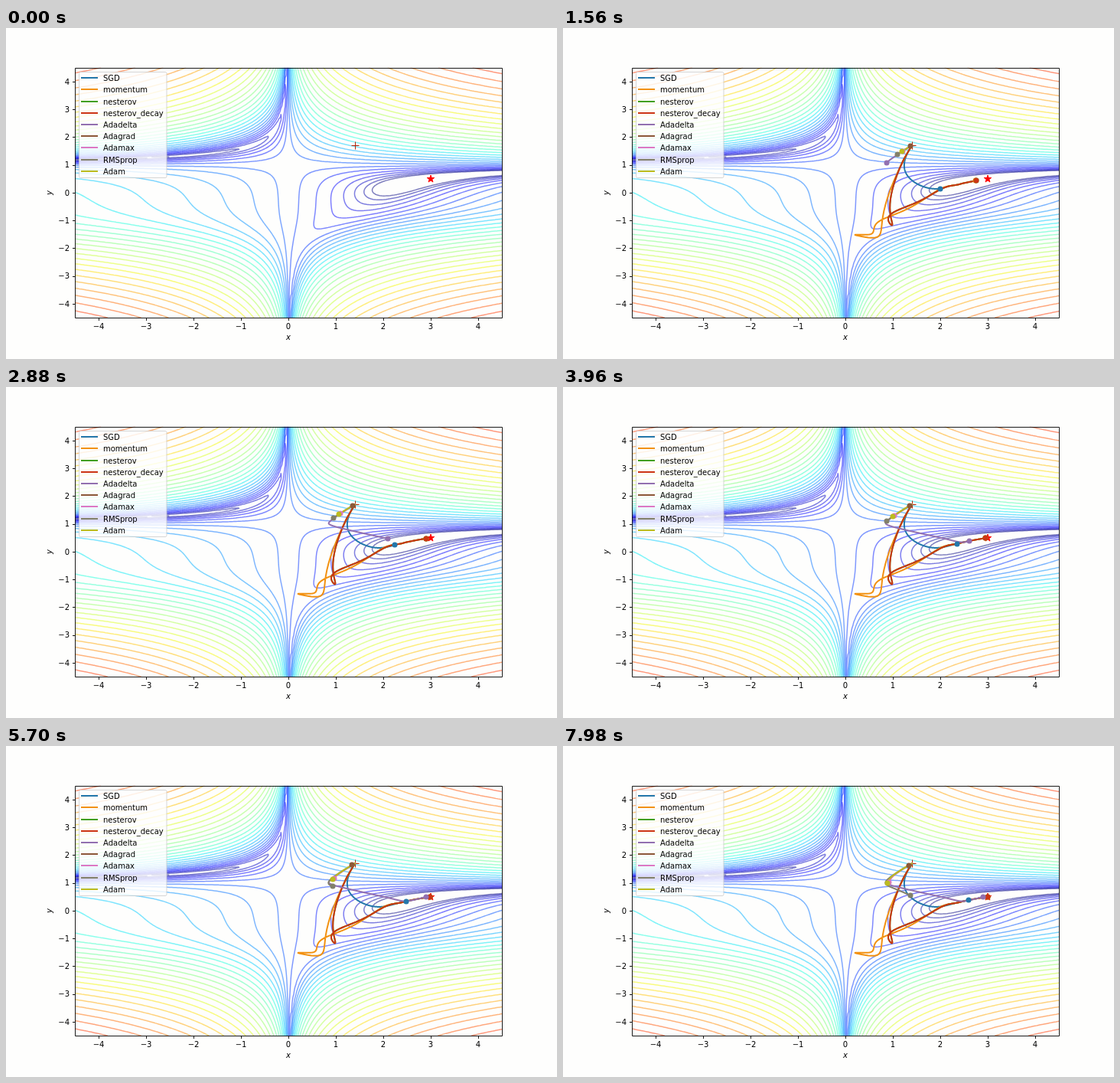
Animation, 720 px wide and 432 px high, one loop 8 s. Source, as an HTML page:

```html
<!DOCTYPE html>
<html lang="en">
<head>
<meta charset="utf-8">
<title>Optimizers on a loss surface</title>
<style>
  html, body { margin: 0; width: 100%; height: 100%; overflow: hidden; background: #fefefd; }
  svg { display: block; }
  text { font: 10px "DejaVu Sans", sans-serif; fill: #000; }
  .math { font-style: italic; }
</style>
</head>
<body>
<svg id="stage" width="720" height="432" viewBox="0 0 720 432"></svg>
<script>
const stage = document.getElementById('stage');
const LIMIT = 4.5, FRAME_MS = 60, LOOP_MS = 8000, STEPS_PER_FRAME = 10, STEPS = 1340;
const START = [1.4, 1.7], MINIMUM = [3, 0.5], RATE = 0.001;
const LEFT = 90, RIGHT = 648, TOP = 51.84, BOTTOM = 378;

const px = x => LEFT + (x + LIMIT) / (2 * LIMIT) * (RIGHT - LEFT);
const py = y => BOTTOM - (y + LIMIT) / (2 * LIMIT) * (BOTTOM - TOP);
const pixel = (x, y) => px(x).toFixed(2) + ' ' + py(y).toFixed(2);
const crisp = v => Math.round(v) + .5; // centre of a pixel, for thin straight lines

function add(tag, attrs, content) {
  const el = document.createElementNS('http://www.w3.org/2000/svg', tag);
  for (const key in attrs) el.setAttribute(key, attrs[key]);
  if (content) el.textContent = content;
  return stage.appendChild(el);
}

// Beale function and its gradient
const TERMS = [1.5, 2.25, 2.625];
const residual = (k, x, y) => TERMS[k - 1] - x + x * y ** k;
const beale = (x, y) => [1, 2, 3].reduce((sum, k) => sum + residual(k, x, y) ** 2, 0);
function gradient(x, y) {
  let gx = 0, gy = 0;
  for (let k = 1; k <= 3; k++) {
    const r = 2 * residual(k, x, y);
    gx += r * (y ** k - 1);
    gy += r * x * k * y ** (k - 1);
  }
  return [gx, gy];
}

// Jet colour map, v from 0 to 1
function jet(v) {
  const ramp = (...stops) => {
    for (let i = 2; i < stops.length; i += 2) {
      if (v <= stops[i]) {
        const t = (v - stops[i - 2]) / (stops[i] - stops[i - 2]);
        return Math.round(255 * (stops[i - 1] + t * (stops[i + 1] - stops[i - 1])));
      }
    }
  };
  const r = ramp(0, 0, .35, 0, .66, 1, .89, 1, 1, .5);
  const g = ramp(0, 0, .125, 0, .375, 1, .64, 1, .91, 0, 1, 0);
  const b = ramp(0, .5, .11, 1, .34, 1, .65, 0, 1, 0);
  return `rgb(${r},${g},${b})`;
}

// Contours by marching squares, with levels spaced evenly in the logarithm
function drawContours() {
  const N = 200, LEVELS = 35;
  const axis = Array.from({ length: N }, (_, i) => -LIMIT + 2 * LIMIT * i / (N - 1));
  const z = axis.map(y => axis.map(x => beale(x, y)));
  const levels = Array.from({ length: LEVELS }, (_, n) => 10 ** (6 * n / (LEVELS - 1)));
  const paths = levels.map(() => '');
  for (let j = 0; j < N - 1; j++) for (let i = 0; i < N - 1; i++) {
    const corners = [[i, j], [i + 1, j], [i + 1, j + 1], [i, j + 1]]
      .map(([a, b]) => ({ x: axis[a], y: axis[b], z: z[b][a] }));
    const heights = corners.map(c => c.z);
    const low = Math.min(...heights), high = Math.max(...heights);
    levels.forEach((level, n) => {
      if (level < low || level >= high) return;
      const points = [];
      corners.forEach((p, k) => {
        const q = corners[(k + 1) % 4];
        if ((p.z > level) === (q.z > level)) return;
        const t = (level - p.z) / (q.z - p.z);
        points.push(pixel(p.x + t * (q.x - p.x), p.y + t * (q.y - p.y)));
      });
      if (points.length === 4) {
        const center = heights.reduce((sum, h) => sum + h / 4, 0);
        if ((center > level) !== (heights[0] > level)) points.unshift(points.pop());
      }
      for (let k = 0; k < points.length; k += 2) paths[n] += `M${points[k]}L${points[k + 1]}`;
    });
  }
  paths.forEach((d, n) => d && add('path', {
    d, fill: 'none', stroke: jet(n / (LEVELS - 1)), 'stroke-width': 1.5,
    'stroke-opacity': .5, 'stroke-linecap': 'round', 'clip-path': 'url(#plot)'
  }));
}

// Each rule makes an updater for one coordinate: (gradient, step) -> change
const nesterov = decay => () => {
  let v = 0;
  return (g, t) => {
    const step = RATE / (1 + decay * t) * g;
    v = .9 * v - step;
    return .9 * v - step;
  };
};
const rules = {
  sgd: () => g => -RATE * g,
  momentum: () => { let v = 0; return g => v = .9 * v - RATE * g; },
  adagrad: () => { let a = 0; return g => (a += g * g, -RATE * g / Math.sqrt(a)); },
  rmsprop: () => {
    let a = 0;
    return g => (a = .99 * a + .01 * g * g, -RATE * g / (Math.sqrt(a) + 1e-8));
  },
  adamax: () => {
    let m = 0, u = 0;
    return (g, t) => {
      m = .9 * m + .1 * g;
      u = Math.max(.999 * u, Math.abs(g));
      return -RATE / (1 - .9 ** t) * m / (u + 1e-8);
    };
  },
  adam: () => {
    let m = 0, v = 0;
    return (g, t) => {
      m = .9 * m + .1 * g;
      v = .999 * v + .001 * g * g;
      return -RATE * m / (1 - .9 ** t) / (Math.sqrt(v / (1 - .999 ** t)) + 1e-8);
    };
  }
};

function descend(rule) {
  const stepX = rule(), stepY = rule(), path = [START];
  let [x, y] = START;
  for (let t = 1; t < STEPS; t++) {
    const [gx, gy] = gradient(x, y);
    x += stepX(gx, t);
    y += stepY(gy, t);
    path.push([x, y]);
  }
  return path;
}

// Smooth path through [step, x, y] keys
function throughKeys(keys) {
  const slope = (i, c) => {
    const a = keys[Math.max(i - 1, 0)], b = keys[Math.min(i + 1, keys.length - 1)];
    return (b[c] - a[c]) / (b[0] - a[0]);
  };
  return Array.from({ length: STEPS }, (_, step) => {
    let i = 0;
    while (i < keys.length - 2 && step > keys[i + 1][0]) i++;
    const a = keys[i], b = keys[i + 1], span = b[0] - a[0], t = (step - a[0]) / span;
    return [1, 2].map(c =>
      a[c] + (b[c] - a[c]) * t * t * (3 - 2 * t) +
      span * t * (1 - t) * (slope(i, c) * (1 - t) - slope(i + 1, c) * t));
  });
}

const adadelta = throughKeys([
  [0, 1.4, 1.7], [130, 1.1, 1.37], [260, .87, 1.08], [300, .87, .98], [340, 1.08, .86],
  [480, 2.1, .465], [570, 2.42, .345], [660, 2.61, .375], [820, 2.87, .485],
  [960, 2.9, .49], [1340, 2.91, .49]
]);

const series = [
  ['SGD', '#2377ab', descend(rules.sgd)],
  ['momentum', '#f29111', descend(rules.momentum)],
  ['nesterov', '#429f16', descend(nesterov(0))],
  ['nesterov_decay', '#cc3514', descend(nesterov(1e-6))],
  ['Adadelta', '#9270b0', adadelta],
  ['Adagrad', '#8c5838', descend(rules.adagrad)],
  ['Adamax', '#dc78c4', descend(rules.adamax)],
  ['RMSprop', '#82806a', descend(rules.rmsprop)],
  ['Adam', '#bcbc20', descend(rules.adam)]
].map(([name, color, path]) => ({ name, color, path, points: path.map(p => pixel(...p)) }));

function drawMarkers() {
  const [sx, sy] = [crisp(px(START[0])), crisp(py(START[1]))];
  add('path', { d: `M${sx - 5} ${sy}h10M${sx} ${sy - 5}v10`, stroke: '#b42408' });
  const star = Array.from({ length: 10 }, (_, k) => {
    const r = k % 2 ? 1.91 : 5, a = (k / 5 - .5) * Math.PI;
    return [Math.round(px(MINIMUM[0])) + r * Math.cos(a), Math.round(py(MINIMUM[1])) + r * Math.sin(a)];
  });
  add('polygon', { points: star.join(' '), fill: '#f00', stroke: '#f00' });
}

function drawAxes() {
  const [left, right, top, bottom] = [LEFT, RIGHT, TOP, BOTTOM].map(crisp);
  let ticks = '';
  for (let v = -4; v <= 4; v++) {
    const label = String(v).replace('-', '\u2212');
    ticks += `M${crisp(px(v))} ${bottom}v3.5M${left} ${crisp(py(v))}h-3.5`;
    add('text', { x: px(v), y: 393, 'text-anchor': 'middle' }, label);
    add('text', { x: 83, y: Math.round(py(v) + 3.8), 'text-anchor': 'end' }, label);
  }
  add('path', {
    d: `M${left} ${top}H${right}V${bottom}H${left}Z` + ticks,
    fill: 'none', stroke: '#000', 'stroke-width': .9
  });
  add('text', { x: 369, y: 407, 'text-anchor': 'middle', class: 'math' }, 'x');
  add('text', { transform: 'translate(60 215) rotate(-90)', 'text-anchor': 'middle', class: 'math' }, 'y');
}

function drawLegend() {
  add('rect', {
    x: 95.5, y: 57.5, width: 114.5, height: 138, rx: 2,
    fill: '#fff', stroke: '#ccc', opacity: .8
  });
  series.forEach(({ name, color }, k) => {
    const y = Math.round(65.2 + 15.19 * k);
    add('path', { d: `M98 ${y}h22`, stroke: color, 'stroke-width': 2 });
    add('text', { x: 127, y: y + 4 }, name);
  });
}

add('clipPath', { id: 'plot' }).appendChild(
  add('rect', { x: LEFT, y: TOP, width: RIGHT - LEFT, height: BOTTOM - TOP }));
drawContours();
drawMarkers();
for (const s of series) s.line = add('path', {
  fill: 'none', stroke: s.color, 'stroke-width': 2, 'stroke-linejoin': 'round', 'stroke-linecap': 'square'
});
for (const s of series) s.dot = add('circle', { r: 3.5, fill: s.color });
drawAxes();
drawLegend();

let shown = -1;
function render(now) {
  const frame = Math.floor(now % LOOP_MS / FRAME_MS);
  if (frame !== shown) {
    shown = frame;
    const count = frame * STEPS_PER_FRAME;
    for (const { path, points, line, dot } of series) {
      line.setAttribute('d', count ? 'M' + points.slice(0, count).join('L') : '');
      dot.setAttribute('visibility', count ? 'visible' : 'hidden');
      if (!count) continue;
      const [x, y] = path[count - 1];
      dot.setAttribute('cx', Math.round(px(x)));
      dot.setAttribute('cy', Math.round(py(y)));
    }
  }
  requestAnimationFrame(() => render(performance.now() - origin));
}
const origin = performance.now();
render(0);
</script>
</body>
</html>
```
